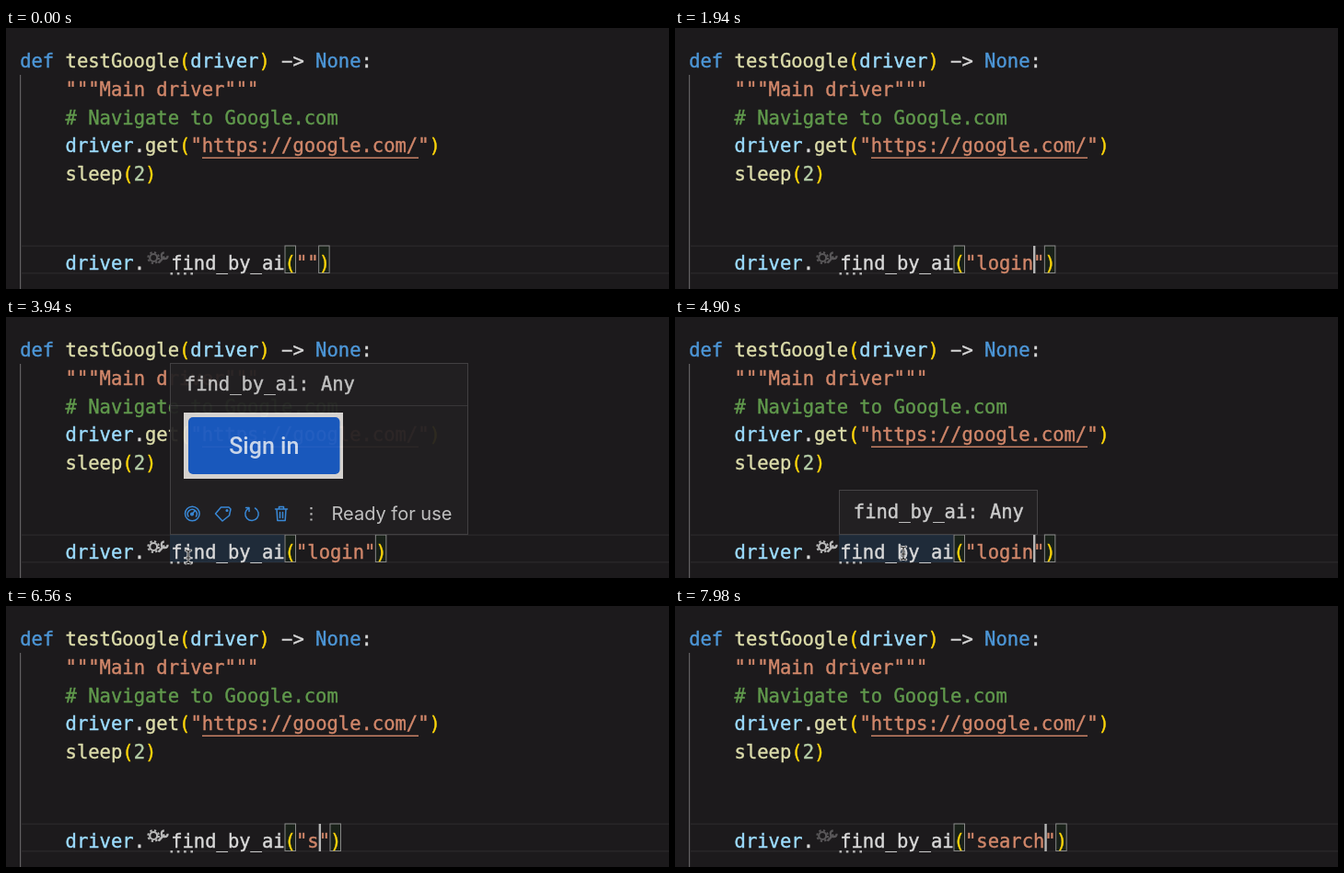
These frames come from a looping animation (720 px wide and 284 px high, 8 s). An HTML page:

```html
<!DOCTYPE html>
<html lang="en">
<head>
<meta charset="utf-8">
<title>Editor session</title>
<style>
  html, body { margin: 0; width: 100%; height: 100%; overflow: hidden; background: #1c1a1c; }
  svg { display: block; width: 100%; height: 100%; }
  text { font: 20.5px "DejaVu Sans Mono", monospace; color: #d8d8d8; white-space: pre; }
  text, tspan { fill: currentColor; stroke: currentColor; stroke-width: .4; }
  .kw { color: #4d97d8; } .fn { color: #dcdcaa; } .var { color: #9cdcfe; }
  .par { color: #ffd60a; } .str { color: #d1876a; } .com { color: #60994c; } .num { color: #b5cea8; }
  .tip { fill: #222022; stroke: #454345; }
  .tipText { color: #cccccc; }
  .ui { stroke: none; }
  .act { fill: none; stroke: #3b8fe2; stroke-width: 1.5; stroke-linejoin: round; stroke-linecap: round; }
  .match { fill: rgba(0, 100, 0, .1); stroke: #888; }
</style>
</head>
<body>
<svg viewBox="0 0 720 284">
  <rect width="720" height="284" fill="#1c1a1c"/>
  <rect x="15" y="51" width="1.2" height="233" fill="#626062"/>
  <path d="M17 237.2H720M17 266.8H720" stroke="#282628" stroke-width="1.5"/>
  <g id="code"></g>
  <rect x="213" y="140.6" width="235" height="1.4" fill="#d1876a"/>

  <rect id="hover" x="178" y="237" width="124.5" height="30" fill="#264f78" opacity=".32"/>
  <rect id="select" x="327.5" y="237" width="61.7" height="30" fill="#264f78"/>
  <rect class="match" x="303" y="237" width="11.5" height="29.5"/>
  <rect class="match" id="close" y="237" width="11.5" height="29.5"/>
  <text y="263"><tspan x="64.6" class="var">driver</tspan>.<tspan x="179.2">find_by_ai</tspan><tspan class="par">(</tspan><tspan class="str" id="arg"></tspan><tspan class="par">)</tspan></text>
  <path d="M178.5 267.3h24.600" stroke="#b4b4b4" stroke-width="2.600" stroke-dasharray="2.600 4.700"/>
  <g id="tool" fill="none">
    <circle cx="160.2" cy="250" r="4" stroke-width="2.2"/>
    <circle cx="160.2" cy="250" r="5.9" stroke-width="2" stroke-dasharray="2.3 2.33"/>
    <path d="M166.300 254.800L171.300 249.400" stroke-width="2.600" stroke-linecap="round"/>
    <path d="M171.800 244.400a3.400 3.400 0 1 0 3.800 3.300" stroke-width="2.200"/>
  </g>
  <rect id="caret" y="237" width="2.4" height="30" fill="#b4b4b4"/>

  <g id="card">
    <rect class="tip" x="178.5" y="50.5" width="323" height="186"/>
    <text class="tipText" x="193.8" y="80">find_by_ai: Any</text>
    <path d="M179 96.5H501" stroke="#3a383a"/>
    <rect x="193" y="104" width="173" height="72" fill="#e1dedb"/>
    <rect x="198" y="109" width="164.5" height="62" rx="5" fill="#195cc6"/>
    <text class="ui" x="280.3" y="148.5" text-anchor="middle" style="font:500 25px Roboto,sans-serif;color:#d3e1f6;filter:blur(.5px)">Sign in</text>
    <g class="act">
      <circle cx="202.3" cy="214" r="7.8"/>
      <path d="M198 217a5 5 0 1 1 8.5 0M202 214.5l3-3.5"/>
      <circle cx="202" cy="214.5" r="1.3"/>
      <path d="M227.5 214l6-7h8.5l2 2-1.5 7-7.5 6z"/>
      <circle cx="240" cy="210.5" r=".8"/>
      <path d="M263 208.3a7.2 7.2 0 1 0 7.5-.3M260.5 207.5h3.5v4"/>
      <path d="M292.5 209h13M296.5 209v-2.5h5v2.5M294 209l.8 12.5h8.4l.8-12.5M297.5 212.5v6M300.5 212.5v6"/>
    </g>
    <path d="M331.5 207v15" stroke="#c4c4c4" stroke-width="2.2" stroke-dasharray="2.2 4"/>
    <text class="tipText ui" x="353.5" y="221" style="font:20px Inter,sans-serif">Ready for use</text>
  </g>
  <g id="hint">
    <rect class="tip" x="178.5" y="188.5" width="215" height="48"/>
    <text class="tipText" x="193.8" y="219">find_by_ai: Any</text>
  </g>

  <g id="mouse" fill="none" stroke-linecap="round">
    <g id="ring" stroke="#d0d0d0">
      <circle r="13.3" stroke-width="1.2" fill="#1c1a1c" fill-opacity=".3"/>
      <circle r="10.3" stroke-width="1"/>
    </g>
    <path id="beam" d="M-3-7Q0-7 0-5Q0-7 3-7M0-5V5M-3 7Q0 7 0 5Q0 7 3 7M-2 1H2" stroke="#dcdcdc" stroke-width="2.4"/>
    <use href="#beam" style="stroke:#222;stroke-width:1.1"/>
    <path d="M-3-7Q0-7 0-5Q0-7 3-7M0-5V5M-3 7Q0 7 0 5Q0 7 3 7M-2 1H2" stroke="#222" stroke-width="1.1"/>
  </g>
</svg>
<script>
const LOOP = 8000, CHAR = 12.341, ARG_X = 327.3, BLINK = 800;
const $ = id => document.getElementById(id);

// Each line: x, baseline, then class/text pairs.
const lines = [
  [15.2, 43, 'kw', 'def ', 'fn', 'testGoogle', 'par', '(', 'var', 'driver', 'par', ')', '', ' −> ', 'kw', 'None', '', ':'],
  [64.6, 73.8, 'str', '"""Main driver"""'],
  [64.6, 104.7, 'com', '# Navigate to Google.com'],
  [64.6, 135.3, 'var', 'driver', '', '.', 'fn', 'get', 'par', '(', 'str', '"https://google.com/"', 'par', ')'],
  [64.6, 166, 'fn', 'sleep', 'par', '(', 'num', '2', 'par', ')']
];
$('code').innerHTML = lines.map(([x, y, ...parts]) => {
  let spans = '';
  for (let i = 0; i < parts.length; i += 2)
    spans += `<tspan class="${parts[i]}">${parts[i + 1].replace('>', '&gt;')}</tspan>`;
  return `<text x="${x}" y="${y}">${spans}</text>`;
}).join('');

// Edits: time, argument text, caret column.
const type = (word, times) => times.map((t, i) => [t, word.slice(0, i + 1), i + 1]);
const edits = [
  [-500, '', 0],
  ...type('login', [840, 1050, 1250, 1450, 1660]),
  [5940, 'login', 2],
  [6220, 'login', 5],
  ...type('search', [6500, 6760, 6980, 7200, 7460, 7660])
];

// Pointer stops: time, x, y.
const stops = [
  [2900, 262, 294], [3350, 198, 261], [4450, 198, 261], [4750, 248, 257],
  [5250, 248, 257], [5800, 358, 260], [6500, 358, 260]
];

const within = (t, a, b) => t >= a && t < b;
const show = (id, on) => $(id).style.display = on ? '' : 'none';

function pointer(t) {
  const i = Math.max(1, stops.findIndex(s => s[0] > t));
  const [t0, x0, y0] = stops[i - 1], [t1, x1, y1] = stops[i];
  const p = Math.min(1, Math.max(0, (t - t0) / (t1 - t0)));
  const e = p * p * (3 - 2 * p);
  return [x0 + (x1 - x0) * e, y0 + (y1 - y0) * e];
}

function draw(t) {
  const [since, word, col] = edits.filter(e => e[0] <= t).pop();
  $('arg').textContent = `"${word}"`;
  $('close').setAttribute('x', ARG_X + (word.length + 1) * CHAR);
  $('caret').setAttribute('x', ARG_X + col * CHAR);
  show('caret', (t - since) % BLINK < BLINK / 2);
  show('select', within(t, 6220, 6500));

  $('tool').setAttribute('stroke', within(t, 2700, 7700) ? '#b9b9b9' : '#585658');
  show('hover', within(t, 3650, 5400));
  show('card', within(t, 3700, 4600));
  $('card').setAttribute('opacity', 0.94 * Math.min(1, Math.max(0, (t - 3700) / 100)));
  show('hint', within(t, 4600, 5400));

  show('mouse', within(t, 2900, 6500));
  $('mouse').setAttribute('transform', `translate(${pointer(t)})`);
  show('ring', within(t, 5920, 6080) || within(t, 6180, 6300));
}

function tick() {
  draw(performance.now() % LOOP);
  requestAnimationFrame(tick);
}
tick();
</script>
</body>
</html>
```
